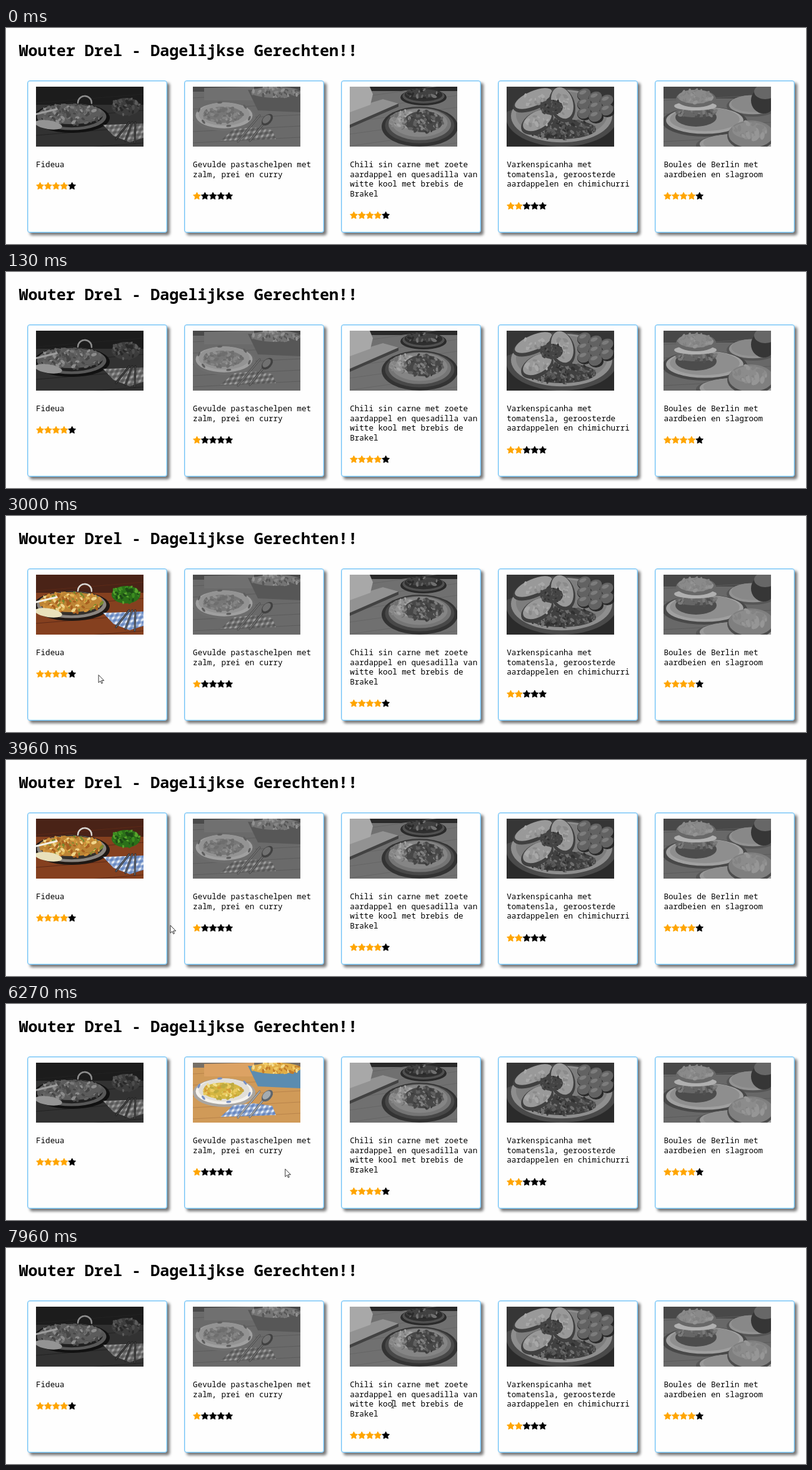
An HTML page with a canvas for the animation above (8000 ms loop, 1280 by 346 pixels).

```html
<!DOCTYPE html>
<html lang="nl">
<head>
<meta charset="utf-8">
<title>Dagelijkse Gerechten</title>
<style>
  html, body { margin: 0; width: 100%; height: 100%; overflow: hidden; background: #fefefe; }
  body { position: relative; color: #000; font-family: "Noto Sans Mono", monospace; }
  h1, p { margin: 0; white-space: pre; }
  h1 { position: absolute; left: 20.5px; top: 18.3px; font-size: 25.08px; line-height: 34px; }
  .card {
    position: absolute; top: 84px; width: 224px; height: 244px; box-sizing: border-box;
    border: 1px solid #70c2f6; border-radius: 4px; background: #fefefe;
    box-shadow: 4px 4px 4px #777, inset 0 0 0 1px rgba(135, 206, 250, .45);
  }
  .card > * { position: absolute; left: 13px; }
  .card canvas { top: 9px; width: 172px; height: 96px; }
  .card p { top: 125.7px; font-size: 12.6px; line-height: 15.85px; }
  .dim { filter: grayscale(1) brightness(.66); }
  .stars { width: 66px; height: 14px; }
  #pointer { position: absolute; left: 0; top: 0; width: 1280px; height: 346px; }
  #blank { position: absolute; inset: 0; background: #000; }
</style>
</head>
<body>
<h1>Wouter Drel - Dagelijkse Gerechten!!</h1>
<svg id="pointer" viewBox="0 0 1280 346">
  <path id="arrow" d="M0 0V12.4L2.9 9.7 4.8 13.8 6.5 13 4.7 9H8.7Z" fill="#fff" stroke="#222" stroke-width=".9"/>
  <path id="beam" d="M-2.3 -6H2.3M0 -6V6M-2.3 6H2.3" fill="none" stroke="#222"/>
</svg>
<div id="blank"></div>
<script>
const LOOP = 8000, W = 172, H = 96;
const CARD = { left: 34, step: 251.1, width: 224, bottom: 328 };
const byId = id => document.getElementById(id);

// Soft-edged drawing helpers for the dish pictures
function brush(ctx, seed) {
  const random = () => (seed = seed * 16807 % 2147483647) / 2147483647;
  const b = {
    backdrop(top, bottom, horizon = 0) {
      ctx.filter = 'none';
      ctx.fillStyle = top;
      ctx.fillRect(0, 0, W, H);
      ctx.fillStyle = bottom;
      ctx.fillRect(0, horizon, W, H);
      ctx.filter = 'blur(.6px)';
    },
    planks(color, gap, slope) {
      for (let y = gap; y < H + slope; y += gap) b.line(color, 1, 0, y, W, y - slope);
    },
    oval(color, x, y, rx, ry, turn = 0) {
      ctx.beginPath();
      ctx.ellipse(x, y, rx, ry, turn, 0, 7);
      ctx.fillStyle = color;
      ctx.fill();
    },
    trace(points) {
      ctx.beginPath();
      for (let i = 0; i < points.length; i += 2) ctx.lineTo(points[i], points[i + 1]);
    },
    poly(color, ...points) {
      b.trace(points);
      ctx.fillStyle = color;
      ctx.fill();
    },
    line(color, width, ...points) {
      b.trace(points);
      ctx.strokeStyle = color;
      ctx.lineWidth = width;
      ctx.lineCap = 'round';
      ctx.stroke();
    },
    // Underside, rim and well of a dish, each a little smaller
    dish(colors, x, y, rx, ry) {
      colors.forEach((color, i) => b.oval(color, x, y + 3 - 2 * i, rx * (1 - .09 * i), ry * (1 - .1 * i)));
    },
    // Random morsels spread over an ellipse, as many as its area asks for
    food(colors, x, y, rx, ry, size = 3) {
      b.oval(colors[0], x, y, rx, ry);
      for (let n = rx * ry / size / 1.8; n > 0; n--) {
        const a = random() * 6.28, r = Math.sqrt(random()), s = size * (.5 + random());
        b.oval(colors[Math.floor(random() * colors.length)],
          x + Math.cos(a) * r * rx, y + Math.sin(a) * r * ry, s, s * .55, random() * 3);
      }
    },
    cloth(...points) {
      ctx.save();
      b.trace(points);
      ctx.clip();
      b.poly('#e4ebf5', ...points);
      for (let i = 0; i < 2 * W; i += 8) {
        b.line('rgba(62,105,178,.5)', 4, i, 0, i - 45, H);
        b.line('rgba(62,105,178,.5)', 4, 0, i, W, i - 20);
      }
      ctx.restore();
    },
    cutlery(dark, light, x1, y1, x2, y2) {
      b.line(dark, 3, x1, y1, x2, y2);
      b.line(light, 1.2, x1, y1, x2, y2);
    }
  };
  return b;
}

function paella(b) {
  b.backdrop('#4a2317', '#85401f', 29);
  b.planks('#5d2a18', 26, 14);
  b.dish(['#1f1814', '#8a8580', '#34302c'], 57, 47, 61, 24);
  b.food(['#bd8435', '#e1b654', '#a75f20', '#d0913a', '#78892e', '#f0d58b'], 56, 44, 51, 16);
  b.oval('#e9e1bb', 20, 61, 22, 7, .15);
  b.line('#f1eee6', 3, 0, 44, 33, 36);
  for (let a = Math.PI; a < 6.2; a += .2) {
    b.line('#d9d6d2', 2.4, 78 + 11 * Math.cos(a), 26 + 11 * Math.sin(a),
      78 + 11 * Math.cos(a + .2), 26 + 11 * Math.sin(a + .2));
  }
  b.food(['#2b7019', '#3c8d20', '#1d4b16', '#5aa52e'], 144, 32, 23, 14);
  b.cloth(107, 61, 172, 59, 172, 82, 150, 89, 124, 79);
  for (let i = 0; i < 3; i++) b.cutlery('#292b31', '#747b87', 128 + 15 * i, 84 + 3 * i, 149 + 5 * i, 57);
}

function pasta(b) {
  b.backdrop('#776f66', '#d09a58', 8);
  b.planks('#b9844b', 18, 9);
  b.poly('#dca263', 18, 2, 98, 0, 98, 22, 18, 22);
  b.poly('#5b8cb0', 88, 5, 172, 10, 172, 41, 104, 38);
  b.food(['#e0ad46', '#f1ca66', '#c17b2b', '#f4dc91'], 133, 9, 40, 9);
  b.dish(['#a9a5a0', '#f5f3ef', '#e2dfd8'], 50, 45, 50, 23);
  for (let a = .35; a < 6.3; a += 1.05) {
    b.oval('#7890c2', 50 + 43 * Math.cos(a), 44 + 19 * Math.sin(a), 4, 1.7, a + 1.6);
  }
  b.food(['#d4b642', '#eacb60', '#bdaa3f', '#d69c36', '#f1e08f'], 48, 45, 32, 13);
  b.cloth(44, 87, 65, 68, 98, 65, 127, 69, 133, 84);
  b.cutlery('#6d7075', '#b5b7b9', 72, 88, 107, 46);
  b.cutlery('#62666c', '#c4c7c9', 91, 87, 114, 58);
  b.oval('#5e646b', 119, 53, 11, 7, -.8);
  b.oval('#a4abb0', 118, 52, 8, 5, -.8);
}

function chili(b) {
  b.backdrop('#292929', '#707070', 7);
  b.planks('#666', 19, 24);
  b.poly('#424242', 0, 66, 0, 55, 78, 27, 78, 32);
  b.poly('#929292', 0, 36, 53, 20, 78, 27, 0, 61);
  b.poly('#a8a8a8', 0, 0, 32, 0, 37, 12, 33, 29, 0, 41);
  b.dish(['#2a2a2a', '#505050', '#2e2e2e'], 118, 14, 37, 13);
  b.food(['#414141', '#626262', '#2a2a2a', '#707070'], 117, 11, 27, 7);
  b.dish(['#333', '#484848', '#757575', '#858585'], 112, 61, 61, 32);
  b.food(['#909090', '#a5a5a5', '#858585', '#707070'], 88, 53, 23, 14);
  b.food(['#474747', '#606060', '#808080', '#3b3b3b'], 118, 56, 31, 17);
}

function roast(b) {
  b.backdrop('#353535', '#2b2b2b', 48);
  b.dish(['#4a4a4a', '#8e8e8e', '#7d7d7d'], 88, 46, 89, 47);
  b.oval('#363636', 8, 12, 18, 30, .5);
  b.food(['#404040', '#585858', '#303030', '#707070'], 88, 68, 55, 16);
  const slices = [[43, 20, 35, 15, -.4], [89, 27, 20, 29, -.3], [49, 55, 28, 17, -.5]];
  for (const [x, y, rx, ry, turn] of slices) {
    b.oval('#404040', x, y + 2, rx, ry, turn);
    b.oval('#999', x, y - 1, rx - 3, ry - 3, turn);
    b.food(['#999', '#a8a8a8', '#8a8a8a'], x, y, rx * .6, ry * .6, 4);
  }
  b.food(['#444', '#5a5a5a', '#303030'], 72, 33, 18, 12);
  for (let i = 0; i < 8; i++) {
    const x = 124 + i % 3 * 18, y = 12 + i * 5;
    b.oval('#282828', x + 1, y + 2, 12, 10);
    b.oval('#626262', x, y, 11, 9, -.4);
    b.oval('#7c7c7c', x - 2, y - 3, 6, 3, -.4);
  }
}

function buns(b) {
  b.backdrop('#484848', '#686868', 19);
  b.planks('#5c5c5c', 22, 9);
  b.dish(['#555', '#929292', '#888'], 143, 28, 42, 17);
  b.oval('#363636', 160, 22, 20, 21);
  b.oval('#676767', 163, 8, 18, 12);
  b.dish(['#484848', '#a0a0a0', '#8e8e8e'], 66, 53, 68, 24);
  b.oval('#4c4c4c', 52, 49, 33, 15);
  b.food(['#666', '#505050', '#7a7a7a'], 52, 41, 33, 8);
  b.oval('#b0b0b0', 51, 31, 34, 7);
  b.oval('#686868', 52, 19, 32, 14);
  b.food(['#8a8a8a', '#949494', '#828282'], 51, 16, 28, 11);
  b.dish(['#565656', '#999', '#8e8e8e'], 117, 91, 65, 18);
  b.oval('#4d4d4d', 140, 79, 38, 23);
  b.oval('#7f7f7f', 140, 76, 36, 22);
  b.food(['#8c8c8c', '#969696', '#848484'], 138, 70, 28, 13, 5);
}

const dishes = [
  { paint: paella, rating: 4, colorful: true, text: 'Fideua' },
  { paint: pasta, rating: 1, colorful: true, text: 'Gevulde pastaschelpen met\nzalm, prei en curry' },
  { paint: chili, rating: 4, text: 'Chili sin carne met zoete\naardappel en quesadilla van\nwitte kool met brebis de\nBrakel' },
  { paint: roast, rating: 2, text: 'Varkenspicanha met\ntomatensla, geroosterde\naardappelen en chimichurri' },
  { paint: buns, rating: 4, text: 'Boules de Berlin met\naardbeien en slagroom' }
];

function stars(rating) {
  const points = Array.from({ length: 10 }, (_, i) => {
    const r = i % 2 ? 3.1 : 6.1, a = i * Math.PI / 5;
    return `${(r * Math.sin(a)).toFixed(2)},${(-r * Math.cos(a)).toFixed(2)}`;
  }).join(' ');
  return [0, 1, 2, 3, 4].map(i => {
    const color = i < rating ? '#ffa500' : '#000';
    return `<polygon points="${points}" transform="translate(${6.5 + 12.8 * i} 7.4)"
      fill="${color}" stroke="${color}" stroke-linejoin="round"/>`;
  }).join('');
}

dishes.forEach((dish, i) => {
  const card = document.createElement('div');
  const lines = dish.text.split('\n').length;
  dish.left = CARD.left + CARD.step * i;
  card.className = 'card';
  card.style.left = dish.left + 'px';
  card.innerHTML = `<canvas width="${W}" height="${H}"></canvas><p>${dish.text}</p>
    <svg class="stars" style="top:${161 + 15.75 * (lines - 1)}px">${stars(dish.rating)}</svg>`;
  document.body.insertBefore(card, byId('pointer'));
  dish.canvas = card.querySelector('canvas');
  dish.paint(brush(dish.canvas.getContext('2d'), 71 + i * 97));
});

const entry = { x: 142, y: 345 };
const moves = [
  { from: 1650, to: 2270, x: 148, y: 254 },
  { from: 3000, to: 3790, x: 243, y: 270 },
  { from: 3820, to: 4030, x: 270, y: 264, power: .75 },
  { from: 4440, to: 5240, x: 361, y: 255, power: .8 },
  { from: 5270, to: 5480, x: 375, y: 255 },
  { from: 5750, to: 6550, x: 495, y: 267, power: 1.2 },
  { from: 6580, to: 7000, x: 516, y: 267 },
  { from: 7410, to: 7960, x: 618.7, y: 250 }
];

// The height settles sooner than the sideways travel
function pointerAt(t) {
  let { x, y } = entry;
  for (const move of moves) {
    if (t < move.from) break;
    const k = Math.min(1, (t - move.from) / (move.to - move.from)), power = move.power || 1;
    x += (move.x - x) * k ** power;
    y += (move.y - y) * k ** (power / 2);
  }
  return { x, y };
}

function render() {
  const t = performance.now() % LOOP, { x, y } = pointerAt(t);
  const visible = t >= moves[0].from, overText = x > 551;
  const show = (id, on) => { byId(id).style.display = on ? '' : 'none'; };
  show('blank', t >= 100 && t < 130);
  show('pointer', visible);
  show('arrow', !overText);
  show('beam', overText);
  byId(overText ? 'beam' : 'arrow').setAttribute('transform', `translate(${x.toFixed(2)} ${y.toFixed(2)})`);
  for (const { canvas, left, colorful } of dishes) {
    // A card lets go slightly past its right edge
    const hovered = visible && y < CARD.bottom && x > left && x < left + CARD.width + 6;
    canvas.className = colorful && !hovered ? 'dim' : '';
  }
  requestAnimationFrame(render);
}
render();
</script>
</body>
</html>
```
